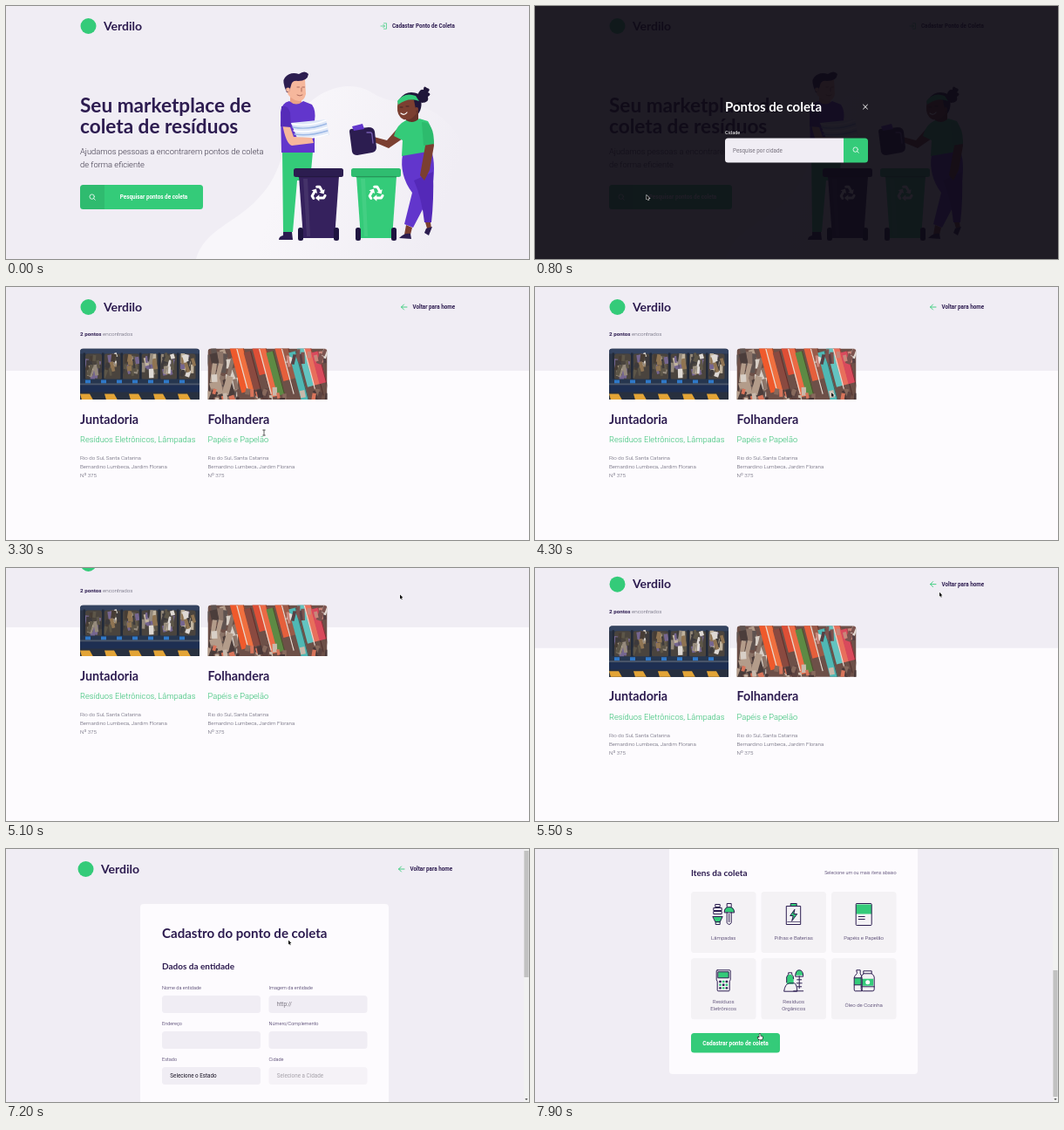
An HTML page with a canvas for the animation above (8 s loop, 600 px wide and 290 px high).

```html
<!DOCTYPE html>
<html lang="pt">
<head>
<meta charset="utf-8">
<title>Pontos de coleta</title>
<style>
html, body { margin: 0; width: 100%; height: 100%; overflow: hidden; background: #f0edf4; }
canvas { display: block; width: 600px; height: 290px; }
</style>
</head>
<body>
<canvas id="stage"></canvas>
<script>
const W = 600, H = 290, LOOP = 8000, STEP = 100;
const canvas = document.getElementById('stage');
const ctx = canvas.getContext('2d');
const dpr = window.devicePixelRatio || 1;
canvas.width = W * dpr;
canvas.height = H * dpr;

const BG = '#f0edf4', PAPER = '#fdfbfe', GREEN = '#34cb79', INK = '#2d1c50', GREY = '#565468';
const NAVY = '#2c1d50', PURPLE = '#6236cc', PEACH = '#f6b79c', BROWN = '#7b3f31';
const TITLE = 'Lato, sans-serif', BODY = 'Roboto, sans-serif';

// ---- helpers ----
function text(str, x, y, size, color, weight = 300, family = BODY, align = 'left') {
  ctx.font = `${weight} ${size}px ${family}`;
  ctx.fillStyle = color;
  ctx.textAlign = align;
  ctx.fillText(str, x, y);
}
const heading = (str, x, y, size, color = INK) => text(str, x, y, size, color, 700, TITLE);

function box(x, y, w, h, color, r = 0) {
  ctx.fillStyle = color;
  ctx.beginPath();
  ctx.roundRect(x, y, w, h, r);
  ctx.fill();
}
function fill(d, color) {
  ctx.fillStyle = color;
  ctx.fill(new Path2D(d));
}
function line(d, color, width = 1) {
  ctx.strokeStyle = color;
  ctx.lineWidth = width;
  ctx.lineCap = ctx.lineJoin = 'round';
  ctx.stroke(new Path2D(d));
}
function dot(x, y, r, color) {
  ctx.fillStyle = color;
  ctx.beginPath();
  ctx.arc(x, y, r, 0, 7);
  ctx.fill();
}
function at(x, y, draw) {
  ctx.save();
  ctx.translate(x, y);
  draw();
  ctx.restore();
}
function seeded(s) {
  return () => (s = (s * 16807) % 2147483647) / 2147483647;
}
const smooth = p => p * p * (3 - 2 * p);
function ramp(t, a, b) {
  return smooth(Math.min(1, Math.max(0, (t - a) / (b - a))));
}

// ---- shared parts ----
function brand(x) {
  dot(x + 9.5, 23, 9, GREEN);
  heading('Verdilo', x + 27, 27.5, 14);
}
function backLink(x) {
  line(`M${x + 7} 23h-6.5m3 -3l-3 3l3 3`, GREEN, 0.9);
  text('Voltar para home', x + 13.5, 25.2, 6.3, INK, 700);
}
function magnifier(x, y) {
  line(`M${x + 2.4} ${y - 0.4}a2.7 2.7 0 1 1 -5.4 0a2.7 2.7 0 1 1 5.4 0M${x + 1.6} ${y + 1.6}l1.7 1.7`, '#fff', 0.8);
}

// ---- home ----
function recycling(x, y) {
  for (let i = 0; i < 3; i++) at(x, y, () => {
    ctx.rotate(i * Math.PI * 2 / 3);
    line('M7.6 2.2L6 5H0.5', '#fff', 3);
    fill('M0.8 1.2V8.8L-3.6 5Z', '#fff');
  });
}
function bin(x, color, lid) {
  at(x, 0, () => {
    fill('M6 195H52L47 266H11Z', color);
    fill('M11 198H16L19 264H15Z', 'rgba(255,255,255,.08)');
    box(0, 186, 57, 10, lid, 2.5);
    box(5, 195, 47, 1.6, 'rgba(0,0,0,.2)');
    box(5, 254, 6, 15, '#1f1540', 2.5);
    box(46, 254, 6, 15, '#1f1540', 2.5);
    recycling(28.5, 215);
  });
}
function man() {
  fill('M317 167H352L349 200H334L329 259H318Z', GREEN);
  fill('M318 259H328L329 268H313Q313 264 318 263Z', NAVY);
  fill('M326 98H339V114Q332 119 326 112Z', '#e9a286');
  fill('M321 84H343L344 101Q342 109 336 109Q325 107 322 98Z', PEACH);
  fill('M322 99Q316 86 320 82Q326 75 336 78Q343 73 347 78Q346 86 335 86Q328 85 327 91L325 98Z', NAVY);
  dot(323.5, 96, 2.4, PEACH);
  line('M334 93h2.5M340 93h2.5M334 102q3 2 6 0M339 94v4', '#8d4a43', 0.7);
  fill('M325 109Q333 116 341 109L351 113Q356 120 354 132V168H316L315 122Q316 111 325 109Z', PURPLE);
  fill('M327 134L367 130L371 148L335 154Z', '#dfe8f8');
  for (let i = 0; i < 5; i++) {
    line(`M${328 + i} ${135 + i * 4}Q347 ${139 + i * 3.6} ${367 + i * 0.6} ${131 + i * 4}`, i % 2 ? '#9db9e6' : '#fff', 1.4);
  }
  fill('M317 135L325 136L330 150L351 151L353 157L328 160Q321 158 317 135Z', PEACH);
  fill('M316 115Q323 113 326 122L327 139L315 138Z', '#552cb8');
}
function woman() {
  fill('M455 170L488 166Q494 182 488 214L467 254L457 250L466 214Q451 194 455 170Z', PURPLE);
  fill('M468 200L490 190Q491 222 488 248H480Q477 220 468 200Z', '#5429b8');
  fill('M459 251L466 254L464 262L457 262ZM481 248H487L488 255H483Z', BROWN);
  fill('M451 266Q457 260 464 261L465 267ZM482 255L489 253L485 263L480 260Z', NAVY);
  fill('M472 107Q473 94 479 96Q479 90 483 94Q488 95 484 99Q489 101 484 104Q486 111 477 111Z', '#20163a');
  fill('M452 106Q460 95 474 101Q480 115 472 125L460 116Z', '#20163a');
  fill('M459 118H473V133H459Z', '#65332a');
  fill('M450 108Q459 101 468 108L471 123Q465 132 456 130Q448 126 449 115Z', BROWN);
  fill('M449 109Q457 98 470 103L474 109Q462 104 450 113Z', GREEN);
  line('M452 116h3M459 115h3', '#2b1520', 0.7);
  line('M453 123q4 3 7 -1', '#fff', 1.2);
  dot(471, 118, 2, BROWN);
  fill('M452 137L458 150L439 163L420 155L422 150L437 154Z', BROWN);
  fill('M459 131Q467 136 474 129L484 132Q491 143 489 166L454 172L455 154L445 149Q448 136 459 131Z', GREEN);
  fill('M478 139Q490 141 491 160L486 188L480 200L475 194L481 160Z', BROWN);
  fill('M477 133Q491 132 491 158L479 160Z', '#2dbb6d');
}
function jug() {
  fill('M394 144Q394 140 399 141L416 139Q422 139 423 144L425 162Q425 167 420 168L403 171Q398 171 397 167Z', NAVY);
  fill('M397 138L409 135L411 141L399 143Z', PURPLE);
  line('M414 145h4q2 0 2 3l1 9', '#765eb0', 1.3);
}
function home() {
  box(0, 0, W, H, BG);
  const glow = ctx.createLinearGradient(380, 0, 560, 60);
  glow.addColorStop(0, '#f8f6fa');
  glow.addColorStop(1, BG);
  fill('M218 290C227 257 264 248 288 222C322 188 316 151 337 123C360 92 398 84 421 100C443 115 472 105 500 128C535 155 520 188 546 215C570 240 570 270 575 290Z', glow);
  brand(85);
  line('M433.5 19.8h3v6.4h-3M430 23h4.4m-1.7 -1.8l1.8 1.8l-1.8 1.8', GREEN, 0.7);
  text('Cadastar Ponto de Coleta', 443, 25.2, 6.28, INK, 700);
  heading('Seu marketplace de', 85, 122.3, 22.6);
  heading('coleta de resíduos', 85, 146.3, 22.6);
  text('Ajudamos pessoas a encontrarem pontos de coleta', 85, 170.4, 9.35, '#3a3446');
  text('de forma eficiente', 85, 185.2, 9.35, '#3a3446');
  box(85, 205, 141, 28, GREEN, 3.5);
  box(85, 205, 28, 28, 'rgba(0,0,0,.08)', [3.5, 0, 0, 3.5]);
  magnifier(99, 219);
  text('Pesquisar pontos de coleta', 169.5, 221.2, 6.35, '#fff', 700, BODY, 'center');
  man();
  woman();
  jug();
  bin(330, '#35215d', NAVY);
  bin(396, GREEN, '#2fbd70');
}

function modal(t) {
  box(0, 0, W, H, 'rgba(14,10,20,.92)');
  heading('Pontos de coleta', 218, 120.5, 15, '#fff');
  line('M376.6 113.2l4.8 4.8m0 -4.8l-4.8 4.8', '#fff', 1);
  text('Cidade', 218, 147, 5.6, '#fff', 400);
  box(218, 151.5, 136, 28, BG, [3.5, 0, 0, 3.5]);
  box(354, 151.5, 28, 28, GREEN, [0, 3.5, 3.5, 0]);
  magnifier(368, 165);
  const typed = t < 2700 ? '' : t < 2800 ? 'Rio' : 'Rio do Sul';
  if (typed) text(typed, 227, 167.6, 6.3, '#1b1626', 400);
  else text('Pesquise por cidade', 227, 167.6, 6.3, '#77727d', 400);
  if (t >= 2400 && t < 3000) {
    const end = typed ? ctx.measureText(typed).width : 0;
    box(227.2 + end, 161.5, 0.5, 7.5, '#1b1626');
  }
}

// ---- results ----
function photo(x, draw) {
  ctx.save();
  ctx.beginPath();
  ctx.roundRect(x, 70.5, 137, 58.5, [4, 4, 0, 0]);
  ctx.clip();
  ctx.translate(x, 70.5);
  draw();
  ctx.restore();
}
// Loose scraps of random size and tilt inside a rectangle.
function scraps(rnd, n, x, y, w, h, size, tones) {
  for (let i = 0; i < n; i++) at(x + rnd() * w, y + rnd() * h, () => {
    ctx.rotate(rnd() * 0.8 - 0.4);
    box(0, 0, size * (0.3 + rnd() * 0.4), size * (0.6 + rnd()), tones[rnd() * tones.length | 0]);
  });
}
function scrapYard() {
  const rnd = seeded(71);
  const tones = ['#958a7c', '#c0b39e', '#5d5648', '#8f7452', '#756690', '#ded9d4', '#3d3a3c', '#463c34'];
  box(0, 0, 137, 59, '#2c3648');
  box(0, 0, 137, 6, '#344360');
  for (let i = 0; i < 6; i++) {
    const x = 6 + i * 21.5;
    box(x, 6, 19, 30, '#4a443e', 3);
    scraps(rnd, 18, x, 5, 14, 20, 8, tones);
    box(x - 2.5, 5, 2.5, 32, '#222a39');
  }
  box(0, 35, 137, 5, '#26364f');
  for (let x = 6; x < 130; x += 18) box(x, 36, 6, 4, '#2f78c8');
  box(0, 40, 137, 2, '#4c586c');
  box(0, 42, 137, 17, '#1e2f52');
  box(0, 50, 137, 9, '#28303f');
  for (let x = 0; x < 140; x += 28) fill(`M${x} 52h11l4 7h-13Z`, '#e3a436');
}
function paperBales() {
  const rnd = seeded(9);
  const stacks = ['#ef5a2c', '#f0703f', '#8a4a40', '#de4f36', '#ec6a45', '#5d8a44', '#e55f3c', '#9a5a48', '#4fb8b4', '#63c4c0', '#e86f5c', '#d94a5c'];
  box(0, 0, 137, 59, '#6d5048');
  scraps(rnd, 40, -2, -4, 36, 58, 14, ['#d8cfc6', '#8b7468', '#4b3d3b', '#b39c8a', '#5f5350']);
  stacks.forEach((c, i) => at(24 + i * 8.6, -5 + (i % 3) * 5, () => {
    ctx.rotate(-0.26);
    box(0, 0, 8.6, 58 - (i % 4) * 7, c);
    box(7.6, 0, 1, 58, 'rgba(60,25,25,.55)');
    if (i % 3 === 1) box(0, 0, 1.2, 54, '#e8ddd4');
  }));
  scraps(rnd, 16, 88, -4, 46, 14, 9, ['#e5ddd6', '#7c5450', '#c9867a', '#574044']);
  scraps(rnd, 30, 0, 44, 137, 14, 9, ['#c9b9ab', '#5c4340', '#87695c', '#493838', '#d8745a']);
}
function place(x, name, items, draw) {
  photo(x, draw);
  heading(name, x, 156.5, 14.3);
  text(items, x, 178.4, 9.3, '#28bd6c');
  ['Rio do Sul, Santa Catarina', 'Bernardino Lumbeca, Jardim Florana', 'Nº 375']
    .forEach((s, i) => text(s, x, 198.3 + i * 10, 6.2, GREY));
}
function results(scroll) {
  box(0, 0, W, H, PAPER);
  at(0, -scroll, () => {
    box(0, 0, W, 96, BG);
    brand(85);
    backLink(453);
    text('2 pontos', 85, 56.3, 6.25, INK, 700);
    text('encontrados', 111, 56.3, 6.25, GREY);
    place(85, 'Juntadoria', 'Resíduos Eletrônicos, Lâmpadas', scrapYard);
    place(231.5, 'Folhandera', 'Papéis e Papelão', paperBales);
  });
}

// ---- form ----
const icons = [
  () => {
    fill('M-12 3h11l-3 7h-5ZM1 -3q0 -5 5.5 -5t6 5v1h-11.5Z', GREEN);
    line('M-9 -11h5v3h-5ZM-11 -7h9v3h-9ZM-11 -3h9v3h-9ZM-12 3h11l-3 6h-5ZM-9 9v3h5v-3M4 -8v-4h5v4M1 -2q0 -6 5.5 -6t6 6ZM4 -2v12q2.5 4 5 0V-2M6.5 0v9', NAVY, 1);
  },
  () => {
    box(-3.5, -12, 7, 3, GREEN);
    fill('M1 -5L-4 2H-0.5L-2 8L4 0H0.5Z', GREEN);
    line('M-8 -9h16v21h-16ZM-3.5 -9v-3h7v3M1 -5L-4 2H-0.5L-2 8L4 0H0.5Z', NAVY, 1);
    line('M-7 9h14', NAVY, 0.7);
  },
  () => {
    box(-9, -11, 18, 11, GREEN);
    line('M-8 -12H8q1 0 1 1V12q0 1 -1 1H-8q-1 0 -1 -1V-11q0 -1 1 -1ZM-6 3h7M-6 6h7', NAVY, 1);
  },
  () => {
    box(-6, -10, 12, 7, GREEN);
    line('M-7 -12H7q1 0 1 1V-1l-1 2V11q0 1 -1 1H-6q-1 0 -1 -1V1l-1 -2V-11q0 -1 1 -1ZM-6 -10h12v7h-12Z', NAVY, 1);
    for (let i = 0; i < 9; i++) box(-5 + (i % 3) * 3.7, 0 + (i / 3 | 0) * 3.7, 2.6, 2.4, i % 2 ? GREEN : NAVY, 0.6);
  },
  () => {
    fill('M2 -6q0 -6 4 -6t5 6ZM-8 4V-4q1 -2 3 -3h2q3 2 3 5v6Z', GREEN);
    line('M-11 12q1 -8 6 -9h6q3 2 3 9ZM-8 2V-4q1 -2 2 -3v-2h4v2q2 1 2 5M2 -5q0 -7 4.5 -7t4.5 7ZM6.5 -5V9M4 -1h5M3.5 3h6M4 7h5M0 12h11', NAVY, 1);
  },
  () => {
    fill('M-11 -3h8v8h-8ZM-2 -2h13v8h-13Z', GREEN);
    line('M-8 -12h4v4q2 3 2 6V12h-8q-1 0 -1 -2V-3q0 -2 3 -5ZM-11 -3h8M-11 5h8M0 -11h9v3h-9ZM0 -8q-3 2 -3 4V10q0 2 2 2h11q2 0 2 -2V-4q0 -2 -3 -4M-3 7h15', NAVY, 1);
    dot(4.5, 2, 2.5, '#fff');
  }
];
const items = ['Lâmpadas', 'Pilhas e Baterias', 'Papéis e Papelão', 'Resíduos|Eletrônicos', 'Resíduos|Orgânicos', 'Óleo de Cozinha'];
const fields = [
  ['Nome da entidade'], ['Imagem da entidade', 'http://', '#77727d'],
  ['Endereço'], ['Número/Complemento'],
  ['Estado', 'Selecione o Estado', '#1b1626'], ['Cidade', 'Selecione a Cidade', '#a5a1a9']
];
const FORM_SCROLL = 277;

function form(scroll) {
  box(0, 0, W, H, BG);
  at(0, -scroll, () => {
    brand(82);
    backLink(450);
    box(154, 63, 285, 472, PAPER, 4);
    heading('Cadastro do ponto de coleta', 179, 101.5, 15.1);
    heading('Dados da entidade', 179, 137.8, 10);
    fields.forEach(([label, value, color], i) => {
      const x = i % 2 ? 301.5 : 179, y = 168 + (i >> 1) * 41;
      text(label, x, y - 7.2, 5.6, INK);
      box(x, y, 113, 20, i === 5 ? '#f5f2f7' : BG, 3.5);
      if (value) text(value, x + 9.3, y + 12.2, 6.3, color, 400);
    });
    at(0, FORM_SCROLL, () => {
      heading('Itens da coleta', 179, 30.8, 10);
      text('Selecione um ou mais itens abaixo', 414.5, 29.2, 5.45, INK, 300, BODY, 'right');
      items.forEach((name, i) => {
        const x = 179 + (i % 3) * 80.5, y = i < 3 ? 49 : 125.3;
        box(x, y, 74.5, 70, '#f4f2f5', 3.5);
        at(x + 37.2, y + 25.5, icons[i]);
        const rows = name.split('|');
        rows.forEach((s, k) => text(s, x + 37.2, y + 55.2 + (rows.length > 1 ? k * 8 - 3.7 : 0), 6.1, INK, 300, BODY, 'center'));
      });
      box(179, 211, 102, 22.5, GREEN, 3.5);
      text('Cadastrar ponto de coleta', 230, 224.5, 6.5, '#fff', 700, BODY, 'center');
    });
  });
  box(594, 0, 6, H, '#f1f1f1');
  box(594.4, 2 + scroll * 0.495, 5.2, 145, '#c1c1c1');
  fill('M595.4 286h3.2l-1.6 2Z', '#505050');
}

// ---- pointer: time, x, y, shape ----
const path = [
  [100, 165, 285, 'arrow'], [500, 128, 217, 'hand'], [700, 128, 217, 'arrow'], [800, 128, 217, 'arrow'],
  [900, 141, 211, 'arrow'], [1600, 212, 190, 'arrow'], [1700, 212, 190, 'arrow'], [2000, 330, 122, 'arrow'],
  [2200, 296, 167, 'beam'], [3700, 296, 167, 'beam'], [3800, 300, 163, 'arrow'], [4200, 335, 125, 'arrow'],
  [5000, 452, 30.5, 'arrow'], [5300, 452, 30.5, 'arrow'], [5800, 486, 23, 'hand'], [6300, 486, 23, 'hand'],
  [6700, 478, 22, 'hand'], [6900, 478, 22, 'arrow'], [7200, 324, 104.5, 'arrow'], [7300, 322, 106, 'arrow'],
  [7700, 260, 214, 'hand'], [7800, 258, 212, 'hand'], [8000, 258, 212, 'hand']
];
const shapes = {
  arrow: () => {
    const d = 'M0 0V5L1.1 4L1.9 5.8L2.7 5.4L1.9 3.6H3.5Z';
    line(d, '#fff', 0.9);
    fill(d, '#111');
  },
  hand: () => {
    const d = 'M-0.6 0.3Q0 -0.6 0.6 0.3V2.4L3 3Q3.4 4.8 2.5 6.6H-1L-2.6 4Q-2.4 3.2 -0.6 4.2Z';
    line(d, '#111', 1.1);
    fill(d, '#fff');
  },
  beam: () => {
    const d = 'M-1.3 -3H1.3M0 -3V3M-1.3 3H1.3';
    line(d, '#fff', 1.6);
    line(d, '#222', 0.7);
  }
};
function pointer(t) {
  const i = path.findIndex((k, n) => n + 1 < path.length && t >= k[0] && t < path[n + 1][0]);
  if (i < 0) return;
  const [t0, x0, y0, shape] = path[i], [t1, x1, y1] = path[i + 1];
  const p = ramp(t, t0, t1);
  at(x0 + (x1 - x0) * p, y0 + (y1 - y0) * p, shapes[shape]);
}

function draw(t) {
  ctx.setTransform(dpr, 0, 0, dpr, 0, 0);
  if (t < 3300) {
    home();
    if (t >= 700) modal(t);
  } else if (t < 6300) results(28 * (ramp(t, 4300, 4700) - ramp(t, 5200, 5600)));
  else if (t < 6900) home();
  else form(FORM_SCROLL * ramp(t, 7200, 7750));
  pointer(t);
}

function tick() {
  const t = performance.now() % LOOP;
  draw(Math.floor(t / STEP) * STEP);
  requestAnimationFrame(tick);
}
tick();
</script>
</body>
</html>
```
